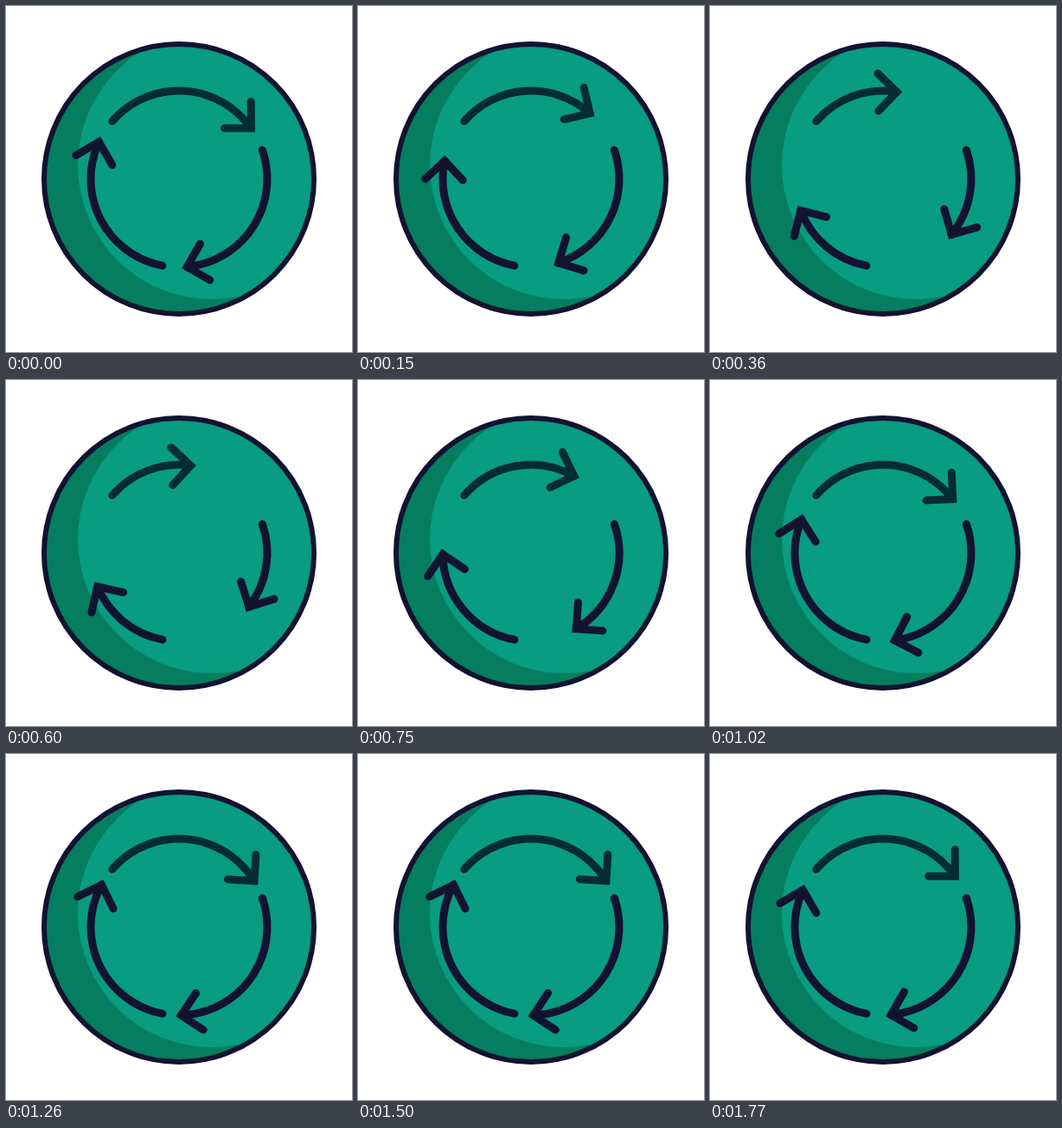
An HTML page that plays this animation: 400 px wide and 400 px high, repeating every 3.8 s.

```html
<!DOCTYPE html>
<html lang="en">
<head>
<meta charset="utf-8">
<title>Cycle arrows</title>
<style>
  @property --sweep {
    syntax: "<number>";
    inherits: true;
    initial-value: 104;
  }

  html, body {
    margin: 0;
    width: 100%;
    height: 100%;
    overflow: hidden;
    background: #fff;
  }

  svg {
    display: block;
    width: 100%;
    height: 100%;
  }

  /* --sweep is the length of each arrow in degrees */
  .arrows {
    fill: none;
    stroke: #121331;
    stroke-width: 9;
    stroke-linecap: round;
    stroke-linejoin: miter;
    animation: sweep 3800ms infinite;
  }

  .arc { stroke-dasharray: var(--sweep) 360; }
  .head { transform: rotate(calc(var(--sweep) * 1deg)); }
  .green { stroke: #052b33; }

  @keyframes sweep {
    0% { --sweep: 104; animation-timing-function: cubic-bezier(.333, 0, .667, 1); }
    12.37% { --sweep: 51; animation-timing-function: cubic-bezier(.3, 0, .2, 1); }
    36.84% { --sweep: 108.5; animation-timing-function: cubic-bezier(.333, 0, .667, 1); }
    46.58%, 100% { --sweep: 104; }
  }
</style>
</head>
<body>
<svg viewBox="0 0 400 400">
  <defs>
    <clipPath id="disc"><circle cx="200" cy="200" r="156"/></clipPath>
    <g id="arrow">
      <circle class="arc" r="102" pathLength="360"/>
      <g class="head">
        <path d="M-21.7-21.7 0 0-21.7 21.7" transform="translate(102) rotate(80)"/>
      </g>
    </g>
  </defs>

  <g clip-path="url(#disc)">
    <circle cx="200" cy="200" r="156" fill="#057e60"/>
    <circle cx="238" cy="184" r="155" fill="#089c80"/>
  </g>
  <circle cx="200" cy="200" r="156" fill="none" stroke="#121331" stroke-width="6"/>

  <g transform="translate(200 200)">
    <g class="arrows">
      <use href="#arrow" class="green" transform="rotate(220.8)"/>
      <use href="#arrow" transform="rotate(340.8)"/>
      <use href="#arrow" transform="rotate(100.8)"/>
    </g>
  </g>
</svg>
</body>
</html>
```
